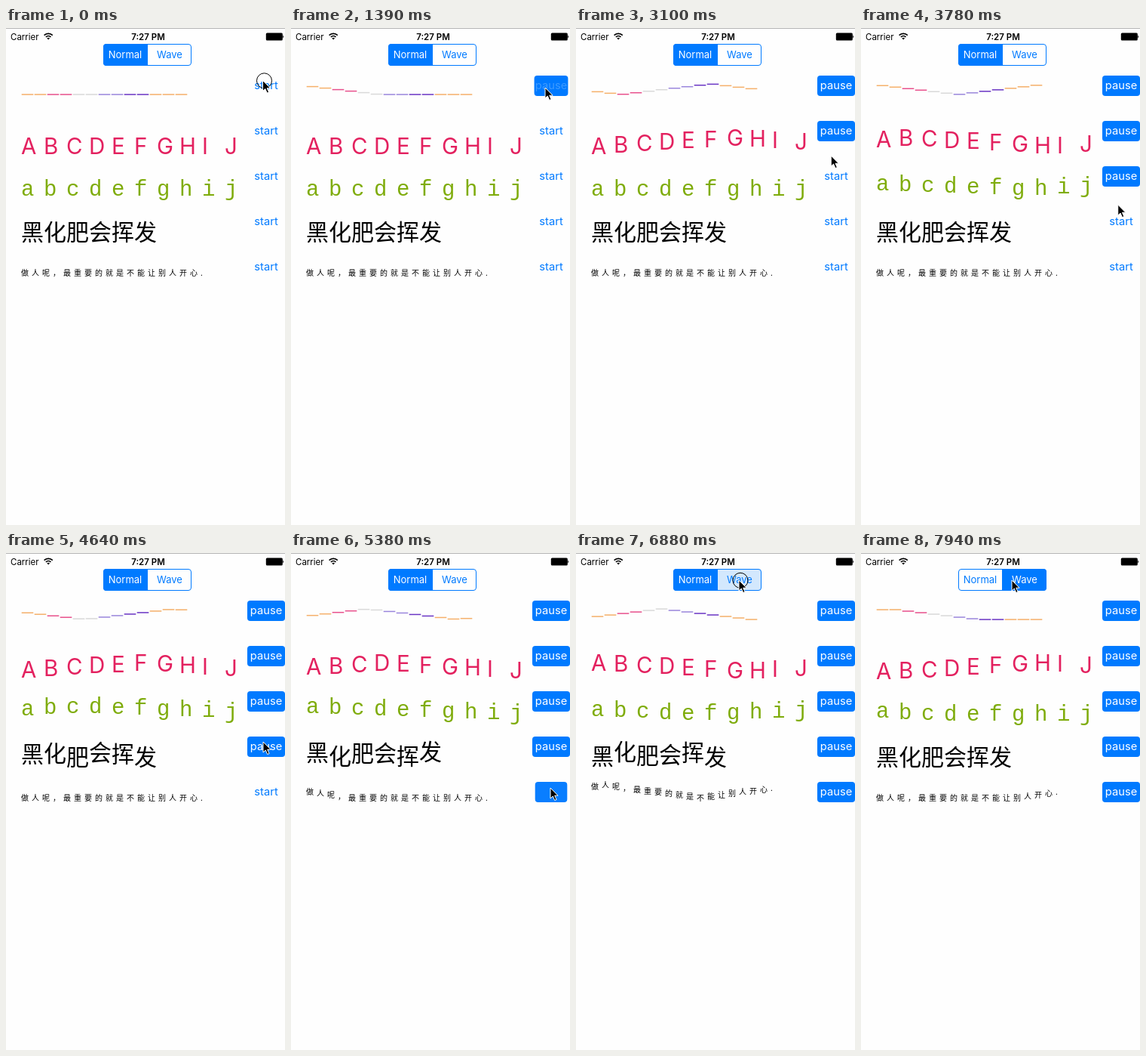
Animation of 370 by 658 pixels, one loop 8000 ms. Source, as an HTML page:

```html
<!DOCTYPE html>
<html lang="zh-Hans">
<head>
<meta charset="utf-8">
<title>Jumping labels</title>
<style>
  html, body { margin: 0; width: 100%; height: 100%; overflow: hidden; background: #fefefe; }
  svg { display: block; width: 100%; height: 100%; }
  text { font-family: Inter, Roboto, sans-serif; white-space: pre; }
  .mid { text-anchor: middle; }
  .blue { fill: #007aff; }
  .button text { font-size: 14.7px; }
  .segment { font-size: 13px; }
</style>
</head>
<body>
<svg viewBox="0 0 370 658">
  <rect width="370" height="658" fill="#fefefe"/>
  <rect width="370" height="1" fill="#b4b4b4"/>
  <text x="6" y="15.5" font-size="11.5">Carrier</text>
  <g fill="none" stroke="#000" stroke-width="1.7">
    <path d="M50.6 9.6a8 8 0 0 1 11.2 0M52.9 12a4.7 4.7 0 0 1 6.6 0"/>
    <path d="M56.2 15.6l-1.9-2a2.7 2.7 0 0 1 3.8 0z" fill="#000" stroke="none"/>
  </g>
  <text class="mid" x="188.5" y="15.5" font-size="11.5" font-weight="600">7:27 PM</text>
  <rect x="344.8" y="6.5" width="22" height="10" rx="1.5"/>
  <path d="M367.3 9.5q2 2 0 4z"/>

  <clipPath id="pill"><rect x="129" y="21" width="117" height="29" rx="4"/></clipPath>
  <g clip-path="url(#pill)">
    <rect id="leftCell" x="129" y="21" width="59" height="29"/>
    <rect id="rightCell" x="188" y="21" width="58" height="29"/>
  </g>
  <rect x="129.5" y="21.5" width="116" height="28" rx="3.5" fill="none" stroke="#007aff"/>
  <path d="M187.5 21v29" stroke="#007aff"/>
  <text id="leftText" class="mid segment" x="158" y="40">Normal</text>
  <text id="rightText" class="mid segment" x="217" y="40">Wave</text>

  <g id="buttons"></g>
  <g id="rows"></g>
  <circle id="ring" r="10" fill="none" stroke="#000"/>
  <path id="cursor" d="M0 0v14l3.3-3 2.4 5.5 2.4-1-2.4-5.3h4.4z" stroke="#fff"/>
</svg>
<script>
const LOOP = 8000, HIGHLIGHT = 6820, SWITCH = 7120, TRAVEL = 500;
const BLUE = '#007aff', PAPER = '#fefefe';
const MONO = '"Liberation Mono", monospace';
const HAN = '"Noto Sans CJK SC", "Noto Sans CJK", sans-serif';
const $ = id => document.getElementById(id);
const clamp = v => Math.max(0, Math.min(1, v));
const ease = p => p * p * (3 - 2 * p);
const triangle = p => 1 - Math.abs(1 - 2 * p);

function set(node, attrs) {
  for (const key in attrs) node.setAttribute(key, attrs[key]);
  return node;
}

function add(parent, tag, attrs, text = '') {
  const node = set(document.createElementNS('http://www.w3.org/2000/svg', tag), attrs);
  node.textContent = text;
  return parent.appendChild(node);
}

// Each glyph jumps once per period, `step` periods after its left neighbour.
// From waveAt on, the row waits for its last glyph before jumping again.
const rows = [
  { text: '_'.repeat(13), pitch: 17, y: 88, amp: 14, step: 1 / 14, start: 1280, period: 297, waveAt: 7230 },
  { text: 'ABCDEFGHIJ', pitch: 30, y: 167, amp: 11.5, step: 1 / 12.5, start: 2584, period: 260, waveAt: 7220,
    fill: '#e3215f', font: '29.5px Inter, sans-serif' },
  { text: 'abcdefghij', pitch: 30, y: 221.5, amp: 10, step: 1 / 18, start: 3432, period: 260, waveAt: 7121,
    fill: '#7fac0c', font: '29px ' + MONO },
  { text: '黑化肥会挥发', pitch: 30, y: 281.3, amp: 8, step: 1 / 2.7, start: 4169, period: 274, waveAt: 7159,
    fill: '#000', font: '350 30px ' + HAN },
  { text: '做人呢，最重要的就是不能让别人开心.', pitch: 14, y: 328, amp: 17, step: 1 / 18, start: 5300, period: 347, waveAt: 7343,
    fill: '#000', font: '10px ' + HAN }
];
const dashColors = ['#f5b06a', '#e8508c', '#d9d9d9', '#9a86dc', '#6a35c4', '#f5b06a', '#f5b06a'];

// Pointer stops: arrival time, x, y
const stops = [
  [0, 340.5, 69.5], [500, 337, 79], [2250, 335, 130], [3300, 340, 190], [3950, 341, 250],
  [5250, 344, 311], [5970, 251, 76], [6700, 216, 36], [7900, 200, 36]
];

rows.forEach((row, r) => {
  row.glyphs = [...row.text].map((char, i) => {
    const x = 20 + row.pitch * i;
    return char === '_'
      ? add($('rows'), 'rect', { x: x + .7, y: row.y - .7, width: 15.6, height: 1.5, fill: dashColors[i >> 1] })
      : add($('rows'), 'text', { x, y: row.y, fill: row.fill, style: 'font:' + row.font }, char);
  });
  const group = add($('buttons'), 'g', { class: 'button', transform: `translate(345 ${76.5 + 60 * r})` });
  row.plate = add(group, 'rect', { y: -13.5, height: 27, rx: 4, fill: BLUE });
  row.startText = add(group, 'text', { class: 'mid blue', y: 4.8 }, 'start');
  row.pauseText = add(group, 'text', { class: 'mid', y: 4.8, fill: '#fff' }, 'pause');
});

function lift(row, i, t) {
  const delay = i * row.step;
  if (t < row.waveAt) {
    const p = (t - row.start) / row.period - delay;
    return p > 0 ? row.amp * triangle(p % 1) : 0;
  }
  const span = 1 + (row.glyphs.length - 1) * row.step;
  const p = (t - row.waveAt) / row.period % span - delay;
  return row.amp * triangle(clamp(p));
}

function drawRow(row, t) {
  row.glyphs.forEach((glyph, i) => set(glyph, { transform: `translate(0 ${-lift(row, i, t)})` }));
  const on = t >= row.start, age = clamp((t - row.start) / 180);
  const width = 36.5 + 13.5 * age;
  set(row.plate, { x: -width / 2, width, opacity: on ? clamp(.83 + .3 * age) : 0 });
  set(row.startText, { opacity: on ? 0 : 1 });
  set(row.pauseText, { opacity: clamp(age * 2 - 1) });
}

function drawSegments(t) {
  const wave = t >= SWITCH;
  set($('leftCell'), { fill: wave ? PAPER : BLUE });
  set($('rightCell'), { fill: wave ? BLUE : t >= HIGHLIGHT ? '#d3e8fd' : PAPER });
  set($('leftText'), { fill: wave ? BLUE : PAPER });
  set($('rightText'), { fill: wave ? PAPER : BLUE });
}

function drawPointer(t) {
  let [, x, y] = stops[0];
  for (const [arrival, toX, toY] of stops.slice(1)) {
    const p = ease(clamp(1 + (t - arrival) / TRAVEL));
    x += (toX - x) * p;
    y += (toY - y) * p;
  }
  const pressed = t < 30 || (t > HIGHLIGHT && t < HIGHLIGHT + 120) ||
    rows.slice(1).some(row => t > row.start - 80 && t < row.start);
  set($('cursor'), { transform: `translate(${x} ${y})` });
  set($('ring'), { transform: `translate(${x + 2} ${y + .3})`, opacity: pressed ? 1 : 0 });
}

const origin = performance.now();
function draw() {
  const t = (performance.now() - origin) % LOOP;
  rows.forEach(row => drawRow(row, t));
  drawSegments(t);
  drawPointer(t);
  requestAnimationFrame(draw);
}
draw();
</script>
</body>
</html>
```
